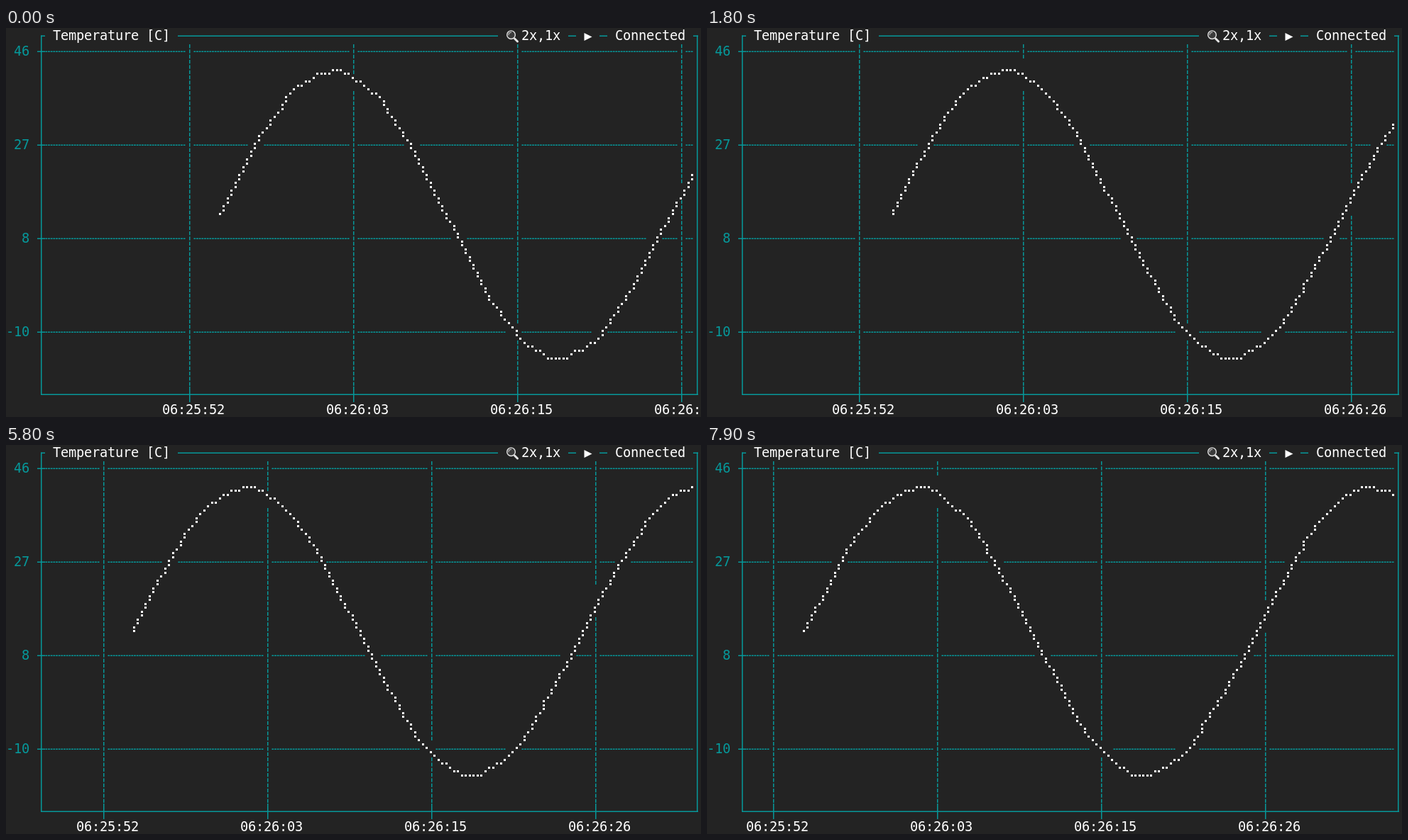
An HTML page with a canvas that plays this animation: 979x549 px, repeating every 8 s.

```html
<!DOCTYPE html>
<html lang="en">
<head>
<meta charset="utf-8">
<title>Temperature plot</title>
<style>
html, body { margin: 0; width: 100%; height: 100%; overflow: hidden; background: #232323; }
canvas { display: block; }
</style>
</head>
<body>
<canvas id="stage" width="979" height="549"></canvas>
<script>
const ctx = document.getElementById('stage').getContext('2d');
const CELL_W = 11, CELL_H = 22;
const BG = '#232323', TEAL = '#06989a', WHITE = '#ffffff';
const LEFT = 4, RIGHT = 88, BOTTOM = 23;
const LOOP = 8000;

// start ms, grid shift in cells, curve shift in dots, index of newest sample
const STEPS = [
  [0, 0, 0.08, 33],
  [800, -2, -3.63, 34],
  [1800, -4, -7.28, 35],
  [4600, -8, -14.88, 37],
  [4900, -10, -18.59, 38],
  [5800, -11, -22.28, 39],
  [7000, -13, -25.88, 40],
  [7900, -15, -29.58, 41],
];
const Y_LABELS = [[1, '46'], [7, '27'], [13, '8'], [19, '-10']];
const X_LABELS = ['06:25:52', '06:26:03', '06:26:15', '06:26:26'];

function rect(x, y, w, h, color) {
  ctx.fillStyle = color;
  ctx.fillRect(x, y, w, h);
}

// Each character sits on its own terminal cell.
function text(str, col, row, color) {
  ctx.fillStyle = color;
  [...str].forEach((ch, i) => ctx.fillText(ch, (col + i) * CELL_W, row * CELL_H + 17));
}

const hLine = (x0, x1, row) => rect(x0, row * CELL_H + 10.5, x1 - x0, 1.5, TEAL);
const vLine = (col, y0, y1) => rect(col * CELL_W + 5, y0, 1.5, y1 - y0, TEAL);

function hDash(col, row) {
  for (let i = 0; i < 3; i++) {
    const x = col * CELL_W + i * CELL_W / 3;
    hLine(x + 0.4, x + 3.2, row);
  }
}

function vDash(col, row) {
  for (let i = 0; i < 3; i++) {
    const y = row * CELL_H + i * CELL_H / 3;
    vLine(col, y + 1, y + 6.3);
  }
}

function roundEven(v) {
  const low = Math.floor(v);
  return v - low === 0.5 ? low + low % 2 : Math.round(v);
}

function samplePoint(k, shift) {
  const drift = 0.06 * Math.max(0, k - 33);
  return [
    Math.round(3.68 * k + drift + shift) + 54,
    Math.round(37.05 - 36.88 * Math.sin(k / 5)) + 10,
  ];
}

function plotLine([x0, y0], [x1, y1], plot) {
  const dx = x1 - x0, dy = Math.abs(y1 - y0), dir = Math.sign(y1 - y0);
  const n = Math.max(dx, dy);
  for (let i = 0; i <= n; i++) {
    plot(x0 + roundEven(i * dx / n), y0 + dir * roundEven(i * dy / n));
  }
}

function drawGrid(shift) {
  const ticks = X_LABELS.map((_, i) => 23 + 21 * i + shift);
  for (const [row, label] of Y_LABELS) {
    text(label, 3 - label.length, row, TEAL);
    hLine(44, 55, row);
    for (let col = LEFT + 1; col < RIGHT; col++) {
      if (!ticks.includes(col)) hDash(col, row);
    }
  }
  ticks.forEach((col, i) => {
    for (let row = 1; row < BOTTOM; row++) vDash(col, row);
    vLine(col, BOTTOM * CELL_H, (BOTTOM + 1) * CELL_H);
    text(X_LABELS[i], col - 3, BOTTOM + 1, WHITE);
  });
}

function drawCurve(shift, last) {
  const dots = new Map();
  for (let k = 0; k < last; k++) {
    plotLine(samplePoint(k, shift), samplePoint(k + 1, shift), (x, y) => {
      if (x < 2 * RIGHT) dots.set(x + ',' + y, [x, y]);
    });
  }
  // Dotted cells replace the grid beneath them.
  for (const [x, y] of dots.values()) {
    rect((x >> 1) * CELL_W, (y >> 2) * CELL_H, CELL_W, CELL_H, BG);
  }
  for (const [x, y] of dots.values()) {
    rect((x >> 1) * CELL_W + [3, 8][x & 1], (y >> 2) * CELL_H + [3, 8, 14, 19][y & 3], 3, 3, WHITE);
  }
}

function drawFrame() {
  const bottomY = BOTTOM * CELL_H + 12;
  vLine(LEFT, 10.5, bottomY);
  vLine(RIGHT, 10.5, bottomY);
  hLine(49, 975, BOTTOM);
  for (const [x0, x1] of [[49, 55], [242, 693], [792, 803], [836, 847], [968, 975]]) hLine(x0, x1, 0);
  text('Temperature [C]', 6, 0, WHITE);
  text('2x,1x', 66, 0, WHITE);
  text('Connected', 78, 0, WHITE);
  ctx.fillStyle = WHITE;
  ctx.beginPath();
  ctx.moveTo(814.5, 7);
  ctx.lineTo(825.5, 12.5);
  ctx.lineTo(814.5, 18);
  ctx.fill();
  drawMagnifier();
}

function drawMagnifier() {
  ctx.lineCap = 'round';
  ctx.strokeStyle = '#e4e4e4';
  ctx.lineWidth = 3;
  ctx.beginPath();
  ctx.moveTo(716.5, 15);
  ctx.lineTo(720.5, 19);
  ctx.stroke();
  ctx.fillStyle = '#3b3b3b';
  ctx.lineWidth = 1.4;
  ctx.beginPath();
  ctx.arc(711.5, 9.7, 5.8, 0, 2 * Math.PI);
  ctx.fill();
  ctx.stroke();
  ctx.strokeStyle = '#a8a8a8';
  ctx.beginPath();
  ctx.arc(711.5, 9.7, 3.4, Math.PI, 1.5 * Math.PI);
  ctx.stroke();
}

function draw([, gridShift, curveShift, last]) {
  rect(0, 0, 979, 549, BG);
  ctx.font = '18.67px "DejaVu Sans Mono", monospace';
  drawGrid(gridShift);
  drawCurve(curveShift, last);
  drawFrame();
}

const start = performance.now();
let shown;
function tick() {
  const t = (performance.now() - start) % LOOP;
  const step = STEPS.findLast(s => s[0] <= t);
  if (step !== shown) draw(shown = step);
  requestAnimationFrame(tick);
}
tick();
</script>
</body>
</html>
```
